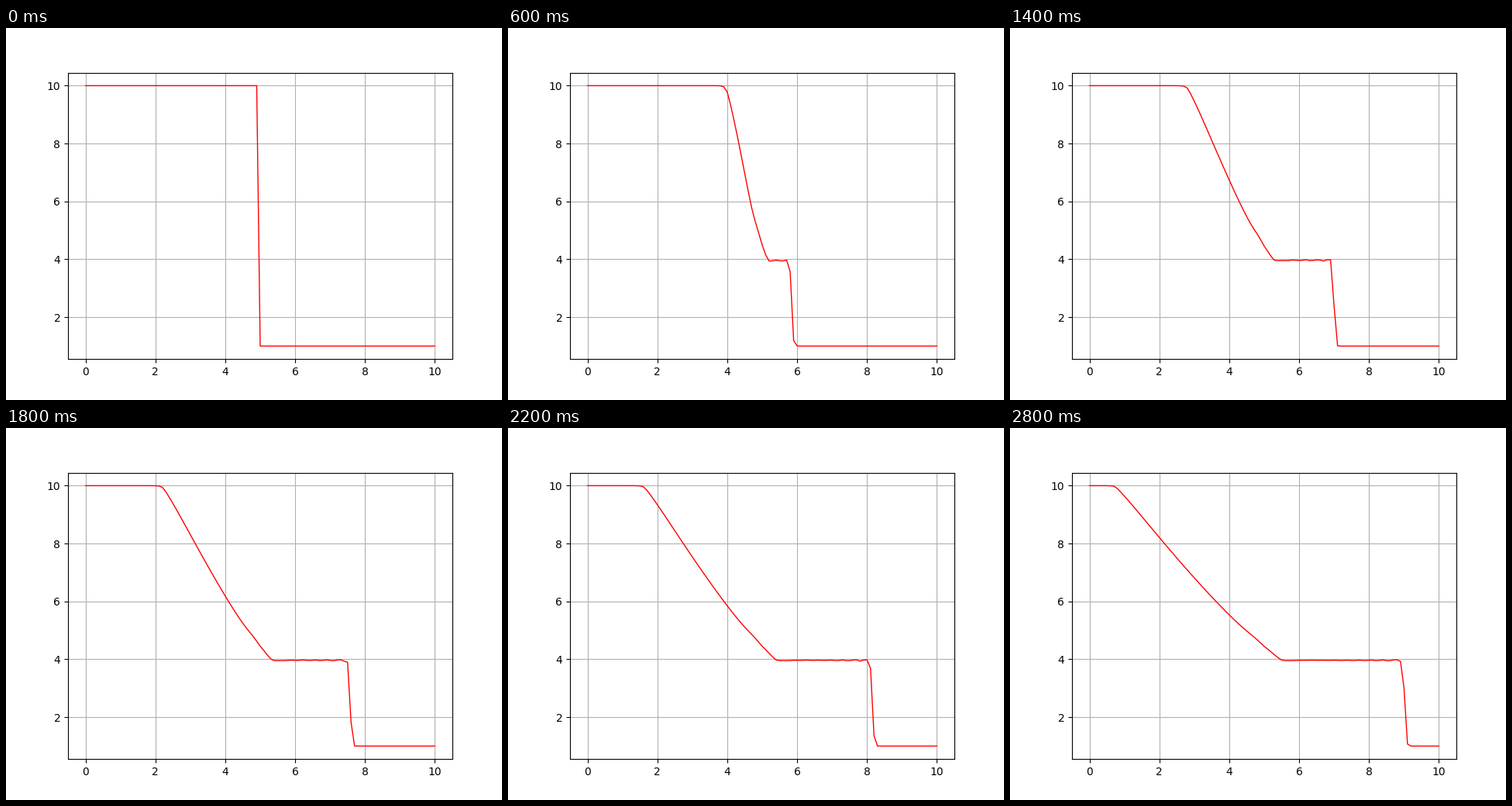
A matplotlib script that plays this animation: 640x480 px, repeating every 3000 ms.

```python
import numpy as np
import matplotlib.pyplot as plt
from matplotlib.animation import FuncAnimation

# Dam break: shallow water equations, Roe waves with a superbee limiter
G = 9.81
DX = 0.1
CFL = 0.8
FRAMES = 15
STEPS_PER_FRAME = 5
X = np.linspace(0, 10, 101)


def superbee(r):
    return np.maximum(0, np.maximum(np.minimum(1, 2 * r), np.minimum(2, r)))


def roe_waves(q):
    """Speeds (family, face) and waves (family, component, face)."""
    h, u = q[0], q[1] / q[0]
    root = np.sqrt(h)
    c = np.sqrt(G * (h[:-1] + h[1:]) / 2)
    v = (root * u)[:-1] + (root * u)[1:]
    v /= root[:-1] + root[1:]
    dh, dq = np.diff(q)
    left = ((v + c) * dh - dq) / (2 * c)
    right = dh - left
    speeds = np.array([v - c, v + c])
    waves = np.array([[left, left * speeds[0]], [right, right * speeds[1]]])
    return speeds, waves


def limited(speeds, waves):
    """Scale each wave by comparing it with its upwind neighbour."""
    upwind = np.where(speeds[:, None] > 0,
                      np.roll(waves, 1, axis=2), np.roll(waves, -1, axis=2))
    size = (waves ** 2).sum(axis=1)
    ratio = (upwind * waves).sum(axis=1) / np.maximum(size, 1e-14)
    return superbee(ratio)[:, None] * waves


def step(q):
    fastest = np.max(np.abs(q[1] / q[0]) + np.sqrt(G * q[0]))
    k = CFL / fastest  # dt / dx
    speeds, waves = roe_waves(q)
    s = speeds[:, None]
    a = np.abs(s)
    flux = (0.5 * a * (1 - k * a) * limited(speeds, waves)).sum(axis=0)
    new = q.copy()
    new[:, 1:] -= k * (np.maximum(s, 0) * waves).sum(axis=0)
    new[:, :-1] -= k * (np.minimum(s, 0) * waves).sum(axis=0)
    new[:, 1:-1] -= k * np.diff(flux)
    return new


def simulate():
    q = np.array([np.where(X < 4.95, 10.0, 1.0), np.zeros(X.size)])
    depths = [q[0]]
    for _ in range(FRAMES - 1):
        for _ in range(STEPS_PER_FRAME):
            q = step(q)
        depths.append(q[0])
    return depths


depths = simulate()
fig, ax = plt.subplots(figsize=(6.4, 4.8), dpi=100)
line, = ax.plot(X, depths[0], color="red", lw=1)
ax.grid(True)


def update(n):
    line.set_ydata(depths[n])
    return line,


anim = FuncAnimation(fig, update, frames=FRAMES, interval=200,
                     repeat=True, repeat_delay=0)
plt.show()
```
